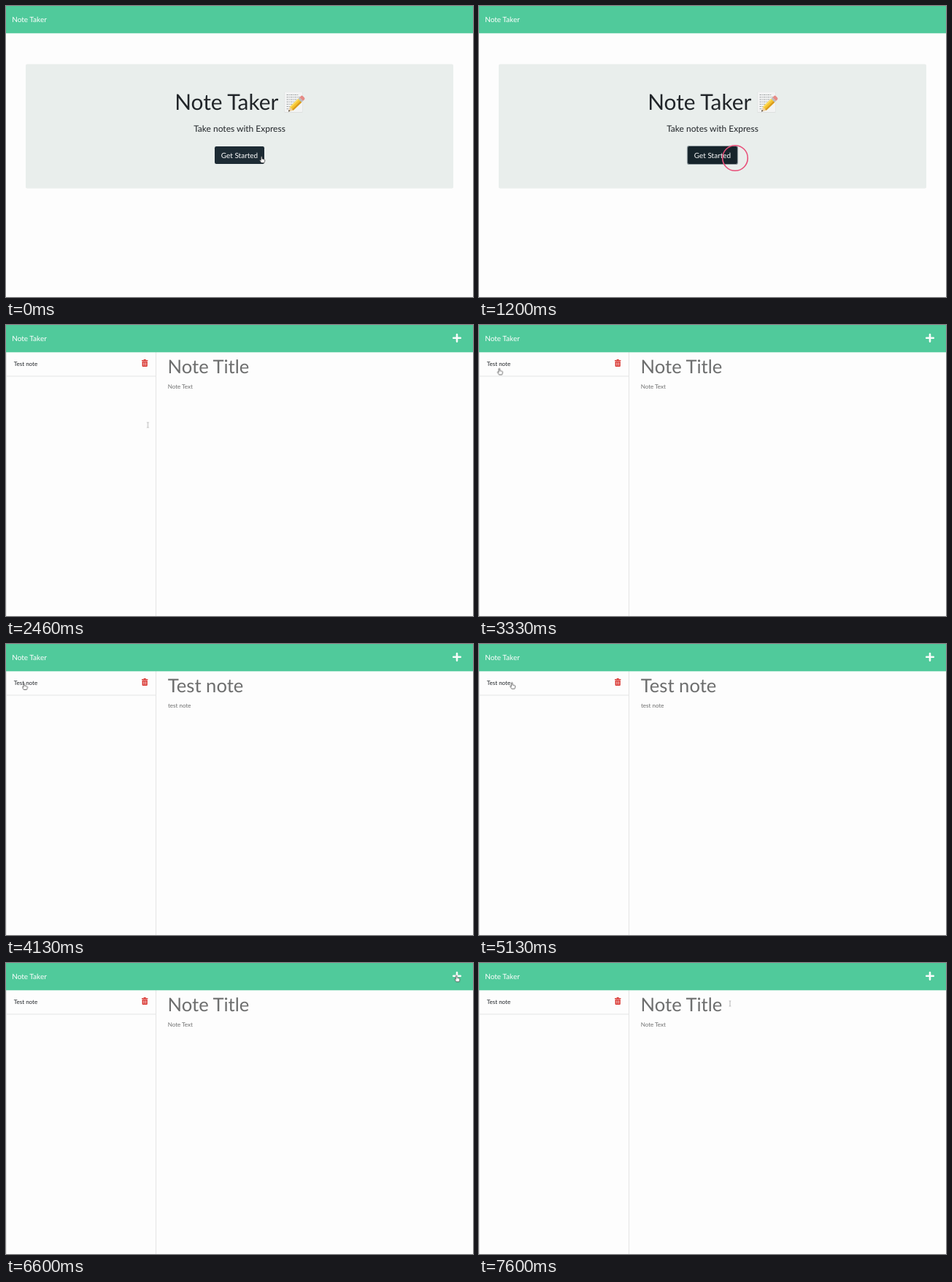
An HTML page that plays this animation: 640 px wide and 398 px high, repeating every 8 s.

```html
<!DOCTYPE html>
<html lang="en">
<head>
<meta charset="utf-8">
<title>Note Taker</title>
<style>
  html, body { margin: 0; width: 100%; height: 100%; overflow: hidden; background: #fdfdfd; }
  svg { display: block; width: 640px; height: 398px; }
  text { font-family: Lato, "Open Sans", sans-serif; text-rendering: geometricPrecision; fill: #212529; }
  .brand { font-size: 10px; fill: #fff; }
  .hero { font-size: 29.87px; }
  .lead { font-size: 12px; }
  .btn { font-size: 10px; fill: #fff; }
  .small { font-size: 8px; }
  .title { font-size: 25.6px; }
  .field text { fill: #6d6e6e; }
  .rule { stroke: #e4e5e5; }

  /* Hard switches: 1% of the loop is 80 ms */
  .home, .app, .item, .blank, .filled, .focus, .caret, .ring, .hand, .arrow, .beam {
    animation: 8s step-end infinite;
  }
  .home   { animation-name: home; }
  .app    { animation-name: app; }
  .item   { animation-name: item; }
  .blank  { animation-name: blank; }
  .filled { animation-name: filled; }
  .focus  { animation-name: focus; }
  .caret  { animation-name: caret; }
  .ring   { animation-name: ring; }
  .hand   { animation-name: hand; }
  .arrow  { animation-name: arrow; }
  .beam   { animation-name: beam; }
  .cursor { animation: move 8s linear infinite; }

  @keyframes home   { 0% { opacity: 1 } 15.75%, 100% { opacity: 0 } }
  @keyframes app    { 0% { opacity: 0 } 15.75%, 100% { opacity: 1 } }
  @keyframes item   { 0% { opacity: 0 } 16.625%, 100% { opacity: 1 } }
  @keyframes blank  { 0% { opacity: 1 } 50.75% { opacity: 0 } 80%, 100% { opacity: 1 } }
  @keyframes filled { 0% { opacity: 0 } 50.75% { opacity: 1 } 80%, 100% { opacity: 0 } }
  @keyframes focus  { 0% { opacity: 0 } 13.25%, 100% { opacity: 1 } }
  @keyframes caret  { 0% { opacity: 0 } 88.75% { opacity: 1 } 95%, 100% { opacity: 0 } }
  @keyframes ring {
    0% { opacity: 0 }      13.25% { opacity: 1 }
    15.75% { opacity: 0 }  49.125% { opacity: 1 }
    51.625% { opacity: 0 } 78.25% { opacity: 1 }
    80.75% { opacity: 0 }  88.25% { opacity: 1 }
    90.75%, 100% { opacity: 0 }
  }
  @keyframes hand {
    0% { opacity: 1 }     13.25% { opacity: 0 }
    33.75% { opacity: 1 } 66.4% { opacity: 0 }
    74.9% { opacity: 1 }  82.9%, 100% { opacity: 0 }
  }
  @keyframes arrow {
    0% { opacity: 0 }     31% { opacity: 1 }
    33.75% { opacity: 0 } 67.7% { opacity: 1 }
    74.9% { opacity: 0 }  82.9% { opacity: 1 }
    84.9%, 100% { opacity: 0 }
  }
  @keyframes beam {
    0% { opacity: 0 }    27.5% { opacity: 1 }
    31% { opacity: 0 }   66.4% { opacity: 1 }
    67.7% { opacity: 0 } 84.9%, 100% { opacity: 1 }
  }
  @keyframes move {
    0%      { transform: translate(351px, 208px) }
    26.7%   { transform: translate(351px, 208px); animation-timing-function: ease-in-out }
    35%     { transform: translate(26px, 60px) }
    39%     { transform: translate(26px, 60px) }
    40.2%   { transform: translate(30px, 66px) }
    41.6%   { transform: translate(28.6px, 61.5px) }
    47.4%   { transform: translate(28.6px, 61.5px) }
    48.5%   { transform: translate(25.5px, 56px) }
    63%     { transform: translate(25.5px, 56px); animation-timing-function: ease-in-out }
    71.6%   { transform: translate(610.5px, 20.5px) }
    74%     { transform: translate(610.5px, 20.5px); animation-timing-function: ease-out }
    75.75%  { transform: translate(620px, 19px) }
    82.2%   { transform: translate(620px, 19px); animation-timing-function: ease-in-out }
    87.5%, 100% { transform: translate(344px, 55.5px) }
  }
</style>
</head>
<body>
<svg viewBox="0 0 640 398">
  <rect width="640" height="398" fill="#fdfdfd"/>

  <g class="home">
    <rect x="27" y="79.5" width="586" height="170" rx="2" fill="#e9eeec"/>
    <text class="hero" x="231.2" y="142">Note Taker</text>
    <g>
      <rect x="381.5" y="117.5" width="25" height="28.5" rx="1" fill="#dddfdf"/>
      <rect x="382" y="117.5" width="24" height="27.5" rx="1" fill="#f2f3f3"/>
      <path d="M384.5 121.5h16M384.5 124.7h18M384.5 127.9h15M384.5 131.1h13M384.5 134.3h10M384.5 137.5h7M384.5 140.7h4"
            stroke="#a3a7a8" stroke-width="1" stroke-dasharray="2.6 .8 1.4 .7"/>
      <g transform="translate(387 144.5) rotate(-44)">
        <path d="M0 0L6-3.4V3.4Z" fill="#efcf9c"/>
        <path d="M0 0L2.2-1.2V1.2Z" fill="#3b3633"/>
        <path d="M6-3.4H22V3.4H6Z" fill="#f5c32f"/>
        <path d="M6 1.2H22V3.4H6Z" fill="#d99a1e"/>
        <path d="M6-3.4H22V-1.6H6Z" fill="#fbdc62"/>
        <path d="M22-3.4h2.6v6.8H22Z" fill="#b9bdbe"/>
        <path d="M24.6-3.4h2.4q2 0 2 2v2.8q0 2-2 2h-2.4Z" fill="#e58b86"/>
      </g>
    </g>
    <text class="lead" x="320" y="172.3" text-anchor="middle">Take notes with Express</text>
    <rect x="286" y="192" width="68" height="24" rx="2.2" fill="#1d2b34"/>
    <rect class="focus" x="285.5" y="191.5" width="69" height="25" rx="2.5" fill="#16242b" stroke="#8d989d" stroke-width="1.2"/>
    <text class="btn" x="320" y="207.5" text-anchor="middle">Get Started</text>
  </g>

  <g class="app">
    <path class="rule" d="M.5 37V398M205.5 37V398"/>
    <g class="item">
      <path class="rule" d="M0 70H205"/>
      <text class="small" x="10.8" y="56.3">Test note</text>
      <g fill="#d9332e">
        <path d="M186 48h2.4l.6-.9h2.4l.6.9h2.4v1.2H186Z"/>
        <path fill-rule="evenodd" d="M186.6 49.8h7.2V56q0 1-1 1h-5.2q-1 0-1-1ZM188.1 51v4.8h.6V51ZM189.9 51v4.8h.6V51ZM191.7 51v4.8h.6V51Z"/>
      </g>
    </g>
    <g class="field">
      <g class="blank">
        <text class="title" x="221.6" y="66.3">Note Title</text>
        <text class="small" x="221.8" y="86.8">Note Text</text>
      </g>
      <g class="filled">
        <text class="title" x="221.8" y="66.3">Test note</text>
        <text class="small" x="222" y="86.8">test note</text>
      </g>
    </g>
    <rect class="caret" x="222" y="43" width="1.2" height="28" fill="#4a5056"/>
  </g>

  <rect width="640" height="37.3" fill="#50ca9b"/>
  <text class="brand" x="8.2" y="21.7">Note Taker</text>
  <path class="app" d="M618 13V22.6M613.2 17.8H622.8" stroke="#f6fcf9" stroke-width="2.6" stroke-linecap="round"/>

  <g class="cursor">
    <circle class="ring" r="17.3" fill="none" stroke="#e8507a" stroke-width="1.6"/>
    <path class="hand" d="M-1.6 3.2V-1.3q0-.9.8-.9t.8.9V1.2q1.1-.5 1.5.3 1.1-.3 1.3.5 1-.1 1 .9 0 2-1 3.6H-1.1Q-2.2 4.8-3.2 3.4q-.2-1 .7-.8Z"
          fill="#fff" stroke="#333" stroke-width=".7" stroke-linejoin="round"/>
    <path class="arrow" d="M0 0V6.2L1.5 4.9 2.5 7 3.5 6.5 2.6 4.6H4.5Z"
          fill="#111" stroke="#fff" stroke-width=".4" stroke-linejoin="round"/>
    <path class="beam" d="M-1.3-3.6Q0-3.6 0-2.8V2.8Q0 3.6-1.3 3.6M1.3-3.6Q0-3.6 0-2.8M0 2.8Q0 3.6 1.3 3.6"
          fill="none" stroke="#8b8b8b" stroke-width=".6"/>
  </g>
</svg>
</body>
</html>
```
